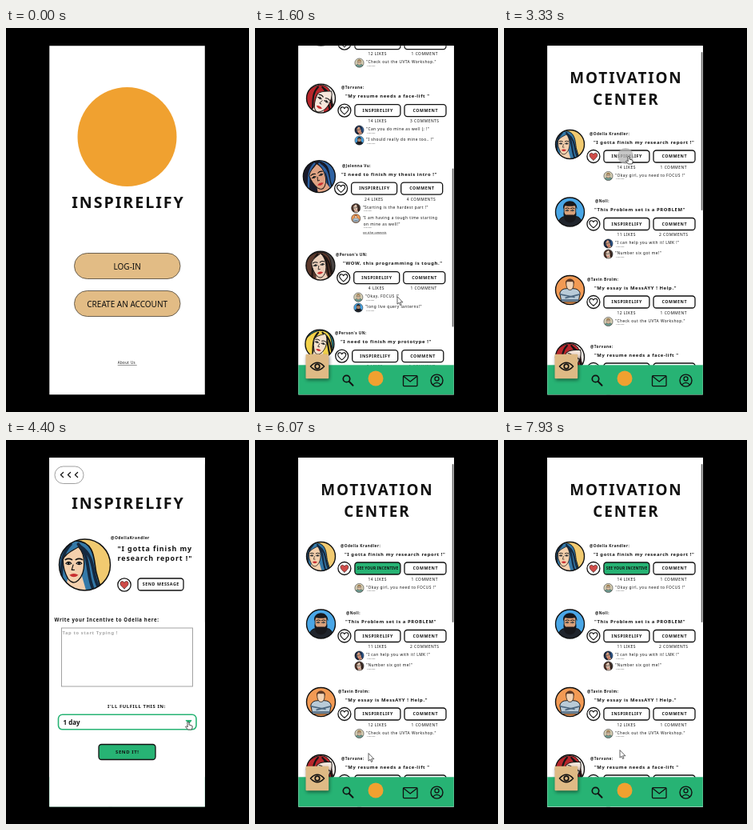
Animation, 304 px wide and 480 px high, one loop 8000 ms. Source, as an HTML page:

```html
<!DOCTYPE html>
<html lang="en">
<head>
<meta charset="utf-8">
<title>Motivation app walkthrough</title>
<style>
html, body { margin: 0; height: 100%; overflow: hidden; background: #000; }
svg { display: block; width: 100vw; height: 100vh; }
text { font-family: "Noto Sans", "Open Sans", sans-serif; white-space: pre; }
.eye { filter: drop-shadow(1px 2px 2px #0007); }
</style>
</head>
<body>
<svg id="stage" viewBox="0 0 304 480" xmlns="http://www.w3.org/2000/svg"></svg>
<script>
const LOOP = 8000;
const INK = '#111', GREEN = '#27b374', TAN = '#e2bc85', ORANGE = '#f0a130';
const BRAND = 'INSPIRELIFY';

// ---- drawing helpers (return SVG markup) ----
const text = (x, y, s, size, { w = 700, ls = .1, fill = INK, mid = false, extra = '' } = {}) =>
  `<text x="${mid ? x + ls * size / 2 : x}" y="${y}" font-size="${size}" font-weight="${w}" fill="${fill}"
    letter-spacing="${ls * size}" ${mid ? 'text-anchor="middle"' : ''} ${extra}>${s}</text>`;
const rect = (x, y, w, h, r, fill, stroke = 'none', sw = 1) =>
  `<rect x="${x}" y="${y}" width="${w}" height="${h}" rx="${r}" fill="${fill}" stroke="${stroke}" stroke-width="${sw}"/>`;
const circle = (x, y, r, fill, stroke = 'none', sw = 1) =>
  `<circle cx="${x}" cy="${y}" r="${r}" fill="${fill}" stroke="${stroke}" stroke-width="${sw}"/>`;
const path = (d, fill, stroke = 'none', sw = 1) =>
  `<path d="${d}" fill="${fill}" stroke="${stroke}" stroke-width="${sw}" stroke-linejoin="round" stroke-linecap="round"/>`;
const group = (transform, content) => `<g transform="${transform}">${content}</g>`;
const button = (x, y, w, h, label, size, fill = '#fff', opt = {}) =>
  rect(x, y, w, h, 3.5, fill, INK, 1.3) + text(x + w / 2, y + h / 2 + size * .36, label, size, { w: 600, mid: true, ...opt });
const heart = (x, y, r, liked) => circle(x, y, r, '#fff', INK, 1.3) +
  group(`translate(${x} ${y}) scale(${r / 8})`,
    path('M0 4.8C-3 2.4-5 .6-5-1.6C-5-4.8-1.2-5.2 0-2.4C1.2-5.2 5-4.8 5-1.6C5 .6 3 2.4 0 4.8Z', liked ? '#cf4b48' : '#fff', INK, liked ? .5 : 1.1));

// ---- avatars, drawn in a circle of radius 10 ----
const eye = (x, y) => path(`M${x - 1.1} ${y}Q${x} ${y - 1.3} ${x + 1.1} ${y}Q${x} ${y + .8} ${x - 1.1} ${y}Z`, '#fff', INK, .35) +
  circle(x, y - .1, .45, INK) + path(`M${x - 1.3} ${y - 1.5}Q${x} ${y - 2.3} ${x + 1.3} ${y - 1.5}`, 'none', INK, .5);
const womanFace = skin => path('M-3 4L-4 10H4L2 3Z', skin) +
  path('M-5-2C-4-5 0-6 1-7C4-4 4 3 1 6Q-1 8-3 5.5Q-5 2-5-2Z', skin, INK, .4) +
  eye(-2.8, -.5) + eye(1.3, -.5) + path('M-1 0l-.6 2h1', 'none', INK, .35) +
  path('M-2.5 4Q-.8 2.8 1 4Q-.8 5.6-2.5 4Z', '#c92f30');
const woman = (bg, hair, shade, skin, x, face = '') => rect(-10, -10, 20, 20, 0, bg) + group(`translate(${x} 0)`,
  path('M0-9.4C8-9 7-1 8 3L10 10H-12V-2C-7-8-3-9.4 0-9.4Z', hair, INK, .5) +
  path('M1-8C6-3 4 4 7 10M2-7C8-3 6 4 9 9M-2-8C-7-3-5 4-6 9', 'none', shade, 1.2) +
  group(face, womanFace(skin)));
const man = (bg, hair, shirt, skin, beard) => rect(-10, -10, 20, 20, 0, bg) +
  path('M-9 10Q-8 3-3 3H4Q8 3 9 10Z', shirt, INK, .5) +
  path('M-4-4Q0-8 4-4V2Q3 5 0 5Q-3 5-4 2Z', skin, INK, .4) +
  path('M-4.6-2C-6-9 5-10 5-2L3.5-4.5Q0-3.5-3.5-4.5Z', hair) + eye(-1.8, -1) + eye(1.8, -1) +
  (beard ? path('M-4.3 0L-3 2H3L4.3 0Q5 7 0 7.5Q-5 7-4.3 0Z', hair) : path('M-1.5 2.6h3', 'none', INK, .5));
const crossedArms = rect(-10, -10, 20, 20, 0, '#f29a54') + path('M-6 8L-7 2Q-6-1-2-1H2Q6-1 7 2L6 8Z', '#b9cbd8', INK, .5) +
  path('M-7 3L3 5M7 3L-3 5.5M-6 7H6', 'none', '#4e6880', .9) +
  path('M-2.5-6H2.5V-3Q2 0 0 0Q-2 0-2.5-3Z', '#f3d3b5', INK, .4) + path('M-3-4C-4-9 4-9 3-4L2-6H-2Z', '#5c3826');
const faces = {
  odella: woman('#f1ca70', '#3479a8', '#15293f', '#f4d0ad', -3.5),
  noll: man('#49a6e6', '#18181c', '#20242c', '#d9a27c', true),
  tavin: crossedArms,
  torvane: woman('#efe9e4', '#b8262b', '#151515', '#f7e6db', 0, 'translate(2 2) rotate(28) scale(1.25)'),
  jolenna: woman('#2e62a2', '#191a2a', '#2e62a2', '#dfa283', -1, 'translate(1 0) rotate(-20) scale(1.15)'),
  person: woman('#4c4645', '#5b382b', '#1e1512', '#ecd0bb', 0, 'rotate(-8) scale(1.2)'),
  blonde: woman('#2b7f86', '#f2d24a', '#161616', '#f6e2cd', 1, 'rotate(14) scale(1.1)'),
  guest: man('#d8d2b8', '#9a7b4f', '#6d9a90', '#f0cfae', false),
};
const avatar = (who, x, y, r, sw = 1.4) =>
  group(`translate(${x} ${y}) scale(${r / 10})`, `<g clip-path="url(#round)">${faces[who]}</g>`) + circle(x, y, r, 'none', INK, sw);

// ---- feed ----
const posts = [
  { y: 160.5, who: 'odella', name: '@Odella Krandler:', nx: 107, qx: 112, quote: 'I gotta finish my research report !', likes: 14, count: '1 COMMENT', liked: true,
    notes: [['guest', 'Okay girl, you need to FOCUS !']] },
  { y: 245, who: 'noll', name: '@Noll:', nx: 114, qx: 113, quote: 'This Problem set is a PROBLEM', likes: 11, count: '2 COMMENTS',
    notes: [['jolenna', 'I can help you with it! LMK !'], ['person', 'Number six got me!']] },
  { y: 342.5, who: 'tavin', name: '@Tavin Brolm:', nx: 104, qx: 113, quote: 'My essay is MessAYY ! Help.', likes: 12, count: '1 COMMENT',
    notes: [['guest', 'Check out the UVTA Workshop.']] },
  { y: 426.5, who: 'torvane', name: '@Torvane:', nx: 108, qx: 113, quote: 'My resume needs a face-lift ', likes: 14, count: '3 COMMENTS',
    notes: [['jolenna', 'Can you do mine as well (; !'], ['noll', 'I should really do mine too.. !']] },
  { y: 524, dx: -4.3, who: 'jolenna', r: 20, name: '@Jolenna Vu:', nx: 109, qx: 108, quote: 'I need to finish my thesis intro !', likes: 24, count: '4 COMMENTS',
    notes: [['person', 'Starting is the hardest part !'], ['tavin', 'I am having a tough time starting', 'on mine as well!']], more: true },
  { y: 635.5, dx: -1.2, who: 'person', name: "@Person's UN:", nx: 101, qx: 110, quote: 'WOW, this programming is tough.', likes: 4, count: '1 COMMENT',
    notes: [['guest', 'Okay, FOCUS !'], ['noll', 'long live query lanterns!']] },
  { y: 733.5, dx: -3.2, who: 'blonde', name: "@Person's UN:", nx: 100, qx: 107, quote: 'I need to finish my prototype !', likes: 8, count: '1 COMMENT',
    notes: [['tavin', 'You can do it !']] },
];

function post(p, sent) {
  const { y, dx = 0, r = 18 } = p;
  const notes = p.notes.map(([who, line, second], i) => {
    const ny = y + 25 + i * 13, nx = 139 + dx;
    const small = { w: 500 };
    return avatar(who, 130.5 + dx, ny - .5, 5.6, .5) +
      text(nx, ny, '"' + line + (second ? '' : '"'), 4.8, small) +
      (second ? text(nx + 1, ny + 8, second + '"', 4.8, small) : '') +
      text(nx + 1, ny + (second ? 11 : 3.6), '2 min ago', 2.2, { w: 500, fill: '#555', ls: 0 });
  }).join('');
  return avatar(p.who, 82.5 + dx * .5, y - 15, r) +
    text(p.nx, y - 26.8, p.name, 4.7) + text(p.qx, y - 15.8, `"${p.quote}"`, 5.9) +
    heart(111.9 + dx, y, 8, p.liked) +
    (sent && p.liked ? button(124.9, y - 7.5, 57, 15, 'SEE YOUR INCENTIVE', 4.8, GREEN, { ls: .02 })
                     : button(124.9 + dx, y - 7.5, 57, 15, BRAND, 5.3)) +
    button(187 + dx, y - 7.5, 52, 15, 'COMMENT', 5.3) +
    text(152.9 + dx, y + 15.2, p.likes + ' LIKES', 4.9, { w: 500, mid: true }) +
    text(212 + dx, y + 15.2, p.count, 4.9, { w: 500, mid: true }) + notes +
    (p.more ? text(135, y + 56, 'see other comments', 2.8, { w: 500, ls: .05, extra: 'text-decoration="underline"' }) : '');
}

const navBar = rect(54, 421.3, 195, 38, 0, GREEN) +
  `<g class="eye">${rect(63.5, 407.7, 28.7, 30.5, 1, '#dfba85')}</g>` +
  path('M69.5 423Q78 413.5 86.5 423Q78 432.5 69.5 423Z', 'none', INK, 1.6) + circle(78, 423, 2.8, 'none', INK, 1.7) +
  circle(114.5, 438.5, 4.2, 'none', INK, 1.7) + path('M117.8 442L122.5 446.7', 'none', INK, 2) +
  circle(151, 438, 9.5, ORANGE) +
  rect(185.5, 434.6, 17.5, 13, 1, 'none', INK, 1.3) + path('M186 435.6L194.2 442L202.5 435.6', 'none', INK, 1.3) +
  circle(227.5, 440.6, 7.5, 'none', INK, 1.4) + circle(227.5, 438.4, 2.5, 'none', INK, 1.3) +
  path('M222.5 445.9Q227.5 440.8 232.5 445.9', 'none', INK, 1.3);

const feed = sent => '<g class="scroll">' +
  text(152, 69, 'MOTIVATION', 18.9, { mid: true }) + text(152, 96, 'CENTER', 18.9, { mid: true }) +
  posts.map(p => post(p, sent)).join('') + '</g>' + navBar +
  `<g class="thumb">${rect(246.7, 30, 1.8, 198, .9, '#666')}</g>`;

// ---- other pages ----
const pill = (y, label) => rect(85.5, y, 132.5, 32, 16, TAN, '#5d5344', .9) +
  text(151.7, y + 20.4, label, 10, { w: 400, ls: 0, mid: true });
const login = circle(151.5, 136, 62, ORANGE) + text(152, 225.3, BRAND, 19.6, { mid: true }) +
  pill(281.5, 'LOG-IN') + pill(328.5, 'CREATE AN ACCOUNT') +
  text(151.5, 420, 'About Us ', 4.4, { w: 400, mid: true, extra: 'text-decoration="underline"' });

const detail = (title, size, label) => rect(61, 33, 36, 21.5, 10.7, '#fff', '#888', .8) +
  [70, 79, 88].map(x => path(`M${x + 1.6} 40.5l-3.2 3l3.2 3`, 'none', INK, 1.2)).join('') +
  text(title === BRAND ? 152 : 156, 86, title, size, { mid: true }) +
  avatar('odella', 98.5, 156, 32, 1.5) + text(131, 124, '@OdellaKrandler', 4.9, { w: 600 }) +
  text(139.5, 138.5, '"I gotta finish my', 8.9) + text(139.5, 151.3, 'research report !"', 8.9) +
  heart(148, 181, 8.2, true) + button(165, 173, 57, 15, 'SEND MESSAGE', 5.3) +
  text(60.5, 226.7, label, 6.1, { w: 600 }) + rect(69.5, 235, 164, 73, 0, '#fff', '#999', .9);

const days = ['1 day', '3 days', '7 days', '14 days'];
const form = detail(BRAND, 19.6, 'Write your Incentive to Odella here:') +
  text(70.5, 242.7, 'Tap to start Typing !', 5.8, { w: 600, fill: '#aaa' }) +
  text(127, 335, "I'LL FULFILL THIS IN:", 5.9, { w: 600 }) +
  rect(65.5, 343.3, 172.5, 18.5, 5, '#fff', GREEN, 1.6) +
  text(71.5, 355.5, '7 days', 8, { ls: 0, extra: 'id="choice"' }) +
  path('M225.5 350.5H232L228.8 354.5Z', GREEN, GREEN) +
  button(116, 380.5, 71, 19, 'SEND IT!', 5.9, GREEN) +
  '<g id="menu">' + rect(65.5, 363, 172.5, 66, 4, '#fff', GREEN, 1.2) +
  days.map((d, i) => text(71.5, 374.5 + i * 16, d, 8, { ls: 0 })).join('') + '</g>';

const thanks = detail('YOUR INCENTIVE', 15.1, "Here's your Incentive to Odella:") +
  text(71.5, 246.2, "I'll buy you an ice cream when", 7.6) + text(71.5, 257.8, 'you pass your paper in!', 7.6) +
  text(154, 304, '7 day expiration', 7.5, { w: 600, fill: '#aaa' }) +
  button(102, 380.2, 99, 19, "I'M A GREAT FRIEND", 6, GREEN) +
  text(76, 451, 'Pssst.. your karma is showing (:', 7.6, { w: 600, fill: '#bbb' });

// ---- timeline: page fades [content, start, end], cursor moves [start, end, x, y], taps ----
const pages = [
  [login, -2, -1], [feed(false), 130, 470], [form, 3390, 3540],
  [feed(true), 5540, 5790], [thanks, 6390, 6540], [feed(true), 7560, 7860],
];
const moves = [
  [70, 600, 178, 336], [2670, 2930, 156, 160], [3930, 4350, 228, 352], [4530, 4750, 90, 404],
  [4870, 5130, 142, 392], [6070, 6250, 160, 157], [6820, 7130, 145, 388],
];
const taps = [[70, 230], [3230, 3430], [4400, 4520], [4790, 4890], [5390, 5570], [6260, 6420], [7420, 7590]];
const hovers = [[70, 470], [2900, 3540], [4330, 4900], [5110, 5620], [6230, 6500], [7110, 7680]];

const stage = document.getElementById('stage');
stage.innerHTML = `<defs><clipPath id="round"><circle r="10"/></clipPath>
  <clipPath id="phone"><rect x="54.3" y="22.3" width="194.5" height="436"/></clipPath></defs>
  ${rect(0, 0, 304, 480, 0, '#000')}
  <g clip-path="url(#phone)">
    ${pages.map(([content]) => `<g class="page">${rect(54, 22, 195, 437, 0, '#fff')}${content}</g>`).join('')}
    <g id="cursor">
      <g id="tap">${circle(-4, 0, 10, '#b4b4b4')}</g>
      <g id="arrow">${path('M0 0V9.2L2.1 7.3L3.5 10.5L5 9.8L3.6 6.8H6.5Z', '#fff', '#222', .7)}</g>
      <g id="hand">${path('M-1 1Q0-.6 1 1V4L4.5 5Q5.6 5.5 5 8L4.3 10H-.5L-3.5 6.5Q-3.4 5-1 6.4Z', '#fff', '#222', .8)}</g>
    </g>
  </g>`;
const $ = id => document.getElementById(id);
const groups = [...stage.querySelectorAll('.page')];
const scroller = groups[1].querySelector('.scroll'), thumb = groups[1].querySelector('.thumb');

const ramp = (t, a, b) => Math.min(1, Math.max(0, (t - a) / (b - a)));
const ease = (t, a, b) => { const x = ramp(t, a, b); return x * x * (3 - 2 * x); };
const within = (t, spans) => spans.some(([a, b]) => t >= a && t < b);
const show = (el, on) => el.setAttribute('display', on ? 'inline' : 'none');

function draw(t) {
  pages.forEach(([, a, b], i) => {
    const shown = ramp(t, a, b);
    show(groups[i], shown > 0);
    groups[i].setAttribute('opacity', shown);
  });

  const scroll = 328 * (ease(t, 550, 1680) - ease(t, 1760, 2650));
  scroller.setAttribute('transform', `translate(0 ${-scroll})`);
  thumb.setAttribute('transform', `translate(0 ${scroll * .45})`);

  show($('menu'), t >= 4460 && t < 4870);
  $('choice').textContent = t < 4870 ? days[0] : days[2];

  let x = 170, y = 299;
  for (const [a, b, toX, toY] of moves) {
    const p = ease(t, a, b);
    x += (toX - x) * p;
    y += (toY - y) * p;
  }
  const hand = within(t, hovers);
  show($('cursor'), t >= 70);
  $('cursor').setAttribute('transform', `translate(${x} ${y})`);
  show($('hand'), hand);
  show($('arrow'), !hand);
  const press = Math.max(...taps.map(([a, b]) => Math.min(ramp(t, a, a + 50), 1 - ramp(t, b - 60, b))));
  $('tap').setAttribute('opacity', .75 * press);
}

const start = performance.now();
function tick() {
  draw((performance.now() - start) % LOOP);
  requestAnimationFrame(tick);
}
tick();
</script>
</body>
</html>
```
